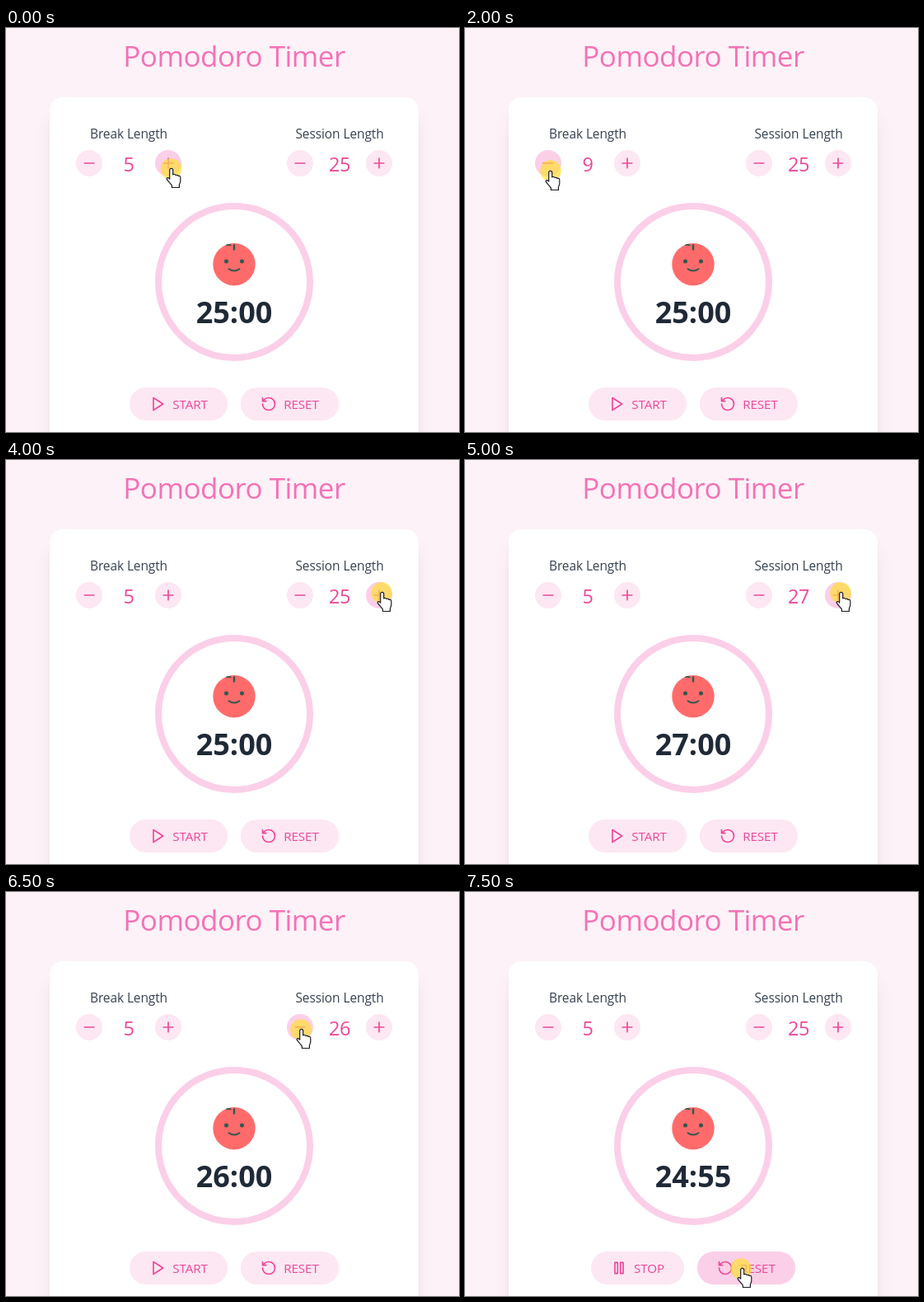
Write an HTML page that moves like this. It is 550 px wide and 490 px high and loops after 8000 ms.

```html
<!DOCTYPE html>
<html lang="en">
<head>
<meta charset="utf-8">
<title>Pomodoro Timer</title>
<style>
  html, body { margin: 0; width: 100%; height: 100%; overflow: hidden; background: #fdf2f8; }
  #stage { position: relative; width: 550px; height: 490px; overflow: hidden; }
  .card {
    position: absolute; left: 53px; top: 84px; width: 448px; height: 424px;
    border-radius: 16px; background: #fff;
    box-shadow: 0 20px 25px -5px rgba(0,0,0,.1), 0 8px 10px -6px rgba(0,0,0,.1);
  }
  svg { position: absolute; left: 0; top: 0; }
  text { font-family: "Open Sans", "Noto Sans", sans-serif; text-anchor: middle; }
  .title { font-size: 35px; letter-spacing: -.55px; fill: #f472b6; }
  .label { font-size: 15.5px; letter-spacing: -.1px; fill: #374151; }
  .value { font-size: 23.5px; letter-spacing: -.5px; fill: #ec4899; }
  .clock { font-size: 36px; font-weight: 700; fill: #1f2937; }
  .action { font-size: 15.2px; letter-spacing: -.1px; fill: #ec4899; }
  .button { fill: #fce7f3; }
  .button.hover { fill: #fbcfe8; }
  .icon { fill: none; stroke: #ec4899; stroke-width: 2; stroke-linecap: round; stroke-linejoin: round; }
  .face { fill: none; stroke: #2d5a4f; stroke-width: 2; stroke-linecap: round; }
</style>
</head>
<body>
<div id="stage">
  <div class="card"></div>
  <svg width="550" height="490" viewBox="0 0 550 490">
    <text class="title" x="277" y="47">Pomodoro Timer</text>
    <text class="label" x="149" y="134">Break Length</text>
    <text class="label" x="405" y="134">Session Length</text>
    <g id="steppers"></g>
    <text class="value" id="breakValue" x="149" y="174"></text>
    <text class="value" id="sessionValue" x="405" y="174"></text>

    <circle cx="277" cy="308" r="92" fill="none" stroke="#fbcfe8" stroke-width="8"/>
    <circle cx="277" cy="286.7" r="25.7" fill="#ff6b6b"/>
    <g class="face">
      <path d="M268 263.3q3-.9 5 .2" stroke-width="1.6"/>
      <path d="M277 263.5v5" stroke-width="2.4"/>
      <path d="M270.5 292.3q6.5 4.6 13 0"/>
      <circle cx="267.5" cy="283" r="2.5" fill="#2d5a4f" stroke="none"/>
      <circle cx="286.5" cy="283" r="2.5" fill="#2d5a4f" stroke="none"/>
    </g>
    <text class="clock" id="clock" x="277" y="358"></text>

    <rect class="button" id="toggle" y="436" height="40" rx="20"/>
    <path class="icon" id="toggleIcon"/>
    <text class="action" id="toggleText" x="223.5" y="462"></text>
    <g id="resetGroup">
      <rect class="button" id="reset" x="285" y="436" width="119" height="40" rx="20"/>
      <path class="icon" transform="translate(309 446) scale(.8333)"
        d="M3 12a9 9 0 1 0 9-9 9.75 9.75 0 0 0-6.74 2.74L3 8M3 3v5h5"/>
      <text class="action" x="358.5" y="462">RESET</text>
    </g>

    <g id="cursor">
      <circle id="glow" r="12.8" fill="#ffdf30" fill-opacity=".68"/>
      <path fill="#fff" stroke="#1c1c28" stroke-width="1.2" stroke-linejoin="round"
        d="M-2.3 2.3a2 2 0 0 1 4 0v5.6c1-.8 2.8-.5 3.3.7c1.2-.7 2.6-.2 3 .9c1.5-.6 2.8.2 2.8 1.8v4.2c0 2-1 3-1.4 4.6v3.4h-9v-2.4c-1-1.7-3.6-4-6-7.4c-.9-1.6.8-3 2.5-1.4l.8.9z"/>
    </g>
  </svg>
</div>
<script>
const $ = id => document.getElementById(id);
const STEP = 500, STEPS = 16;
const PLAY = "M6 3l14 9-14 9z";
const PAUSE = "M6 4h4v16H6zM14 4h4v16h-4z";

const steppers = { breakMinus: 101, breakPlus: 197, sessionMinus: 357, sessionPlus: 453 };
$("steppers").innerHTML = Object.entries(steppers).map(([id, x]) => `
  <circle class="button" id="${id}" cx="${x}" cy="164" r="16"/>
  <path class="icon" transform="translate(${x} 164) scale(.8333)"
    d="M-7 0H7${id.endsWith("Plus") ? "M0-7V7" : ""}"/>`).join("");

// Pointer stops: first step, hovered button, fingertip, glow offset from the fingertip.
const stops = [
  { from: 0, over: "breakPlus", x: 201, y: 170, glow: [-.5, 1] },
  { from: 4, over: "breakMinus", x: 104, y: 173, glow: [0, 0] },
  { from: 8, over: "sessionPlus", x: 457, y: 160, glow: [-1, 1] },
  { from: 11, over: "sessionMinus", x: 359, y: 166, glow: [-1, 1] },
  { from: 14, over: "toggle", x: 229, y: 447, glow: [-1, 1] },
  { from: 15, over: "reset", x: 337, y: 456, glow: [-2, 1] }
];

const tent = (step, peak, height) => Math.max(0, height - Math.abs(step - peak));

function render(time) {
  const step = Math.floor(time / STEP) % STEPS;
  const running = step === STEPS - 1;
  const session = 25 + tent(step, 11, 3);

  $("breakValue").textContent = 5 + tent(step, 4, 4);
  $("sessionValue").textContent = session;
  $("clock").textContent = running ? "24:55" : `${session}:00`;

  $("toggle").setAttribute("x", running ? 153 : 150);
  $("toggle").setAttribute("width", running ? 113 : 119);
  $("toggleIcon").setAttribute("d", running ? PAUSE : PLAY);
  $("toggleIcon").setAttribute("transform", `translate(${running ? 177 : 174} 446) scale(.8333)`);
  $("toggleText").textContent = running ? "STOP" : "START";
  $("resetGroup").setAttribute("transform", `translate(${running ? -3 : 0} 0)`);

  const stop = stops.findLast(s => s.from <= step);
  for (const s of stops) $(s.over).classList.toggle("hover", s === stop);
  $("cursor").setAttribute("transform", `translate(${stop.x} ${stop.y})`);
  $("glow").setAttribute("transform", `translate(${stop.glow})`);
}

const start = performance.now();
function tick() {
  render(performance.now() - start);
  requestAnimationFrame(tick);
}
tick();
</script>
</body>
</html>
```
